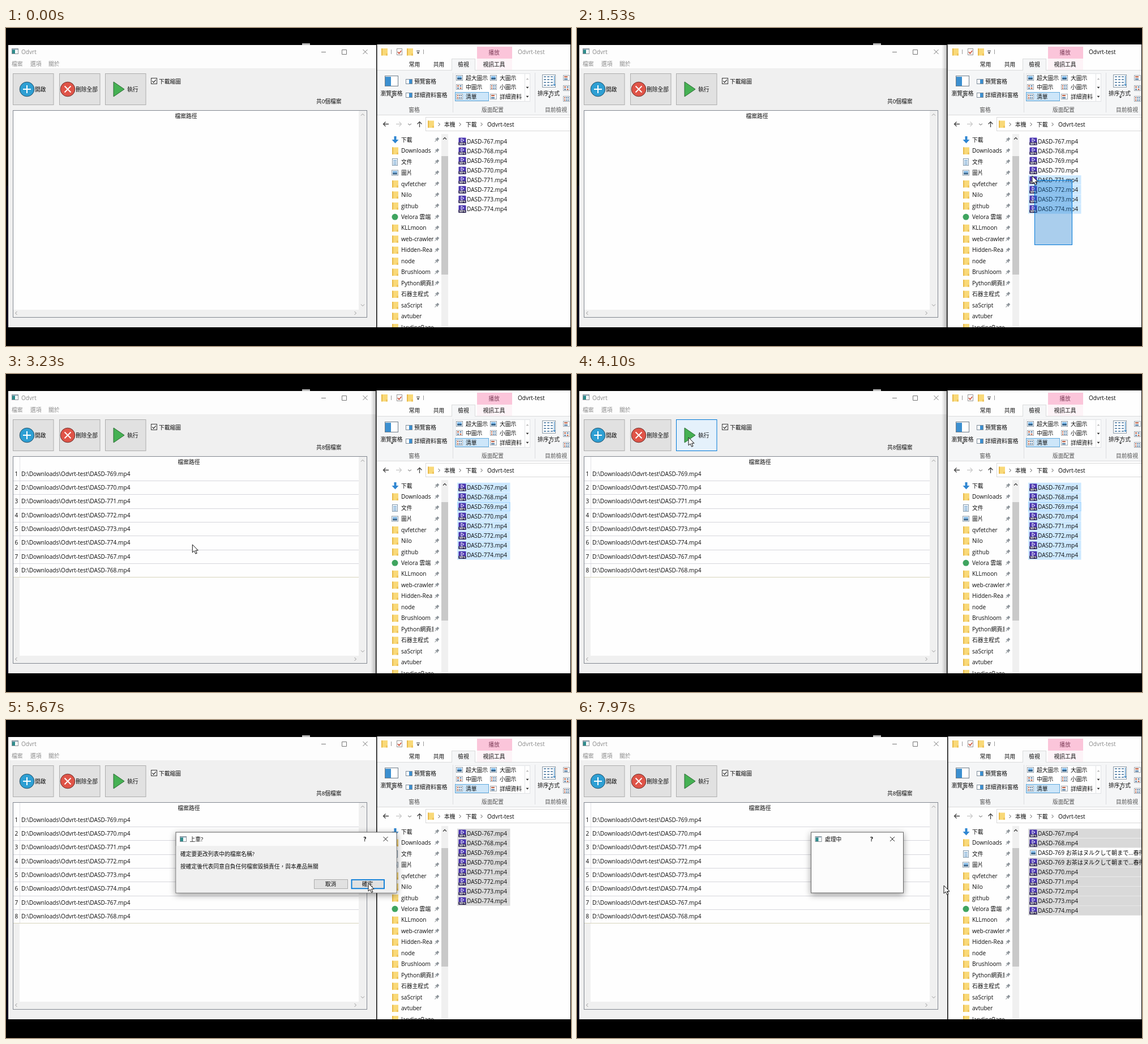
Recreate the animation shown at these times as an HTML page. Size 998 by 561 pixels, loop 8 s.

```html
<!DOCTYPE html>
<html lang="zh-Hant">
<head>
<meta charset="utf-8">
<title>Odvrt</title>
<style>
html, body { margin: 0; width: 100%; height: 100%; overflow: hidden; background: #000; }
svg { display: block; width: 100%; height: 100%; }
text { font-family: 'Open Sans', 'Noto Sans CJK TC', 'Noto Sans CJK JP', sans-serif; white-space: pre; }
.shadow { filter: drop-shadow(0 3px 6px rgba(0, 0, 0, .4)); }
</style>
</head>
<body>
<svg id="stage" viewBox="0 0 998 561" xmlns="http://www.w3.org/2000/svg"></svg>
<script>
const LOOP = 8000;
const INK = '#0c0c0c', GREY = '#8a8a8a', BLUE = '#0078d7';

// Drawing helpers: each returns SVG markup
const rect = (x, y, w, h, fill, stroke, more = '') =>
  `<rect x="${x}" y="${y}" width="${w}" height="${h}" fill="${fill}"${stroke ? ` stroke="${stroke}"` : ''} ${more}/>`;
const box = (x, y, w, h, fill, stroke) => rect(x + .5, y + .5, w - 1, h - 1, fill, stroke);
const path = (d, stroke, fill = 'none', w = 1) =>
  `<path d="${d}" stroke="${stroke}" fill="${fill}" stroke-width="${w}"/>`;
const fontSize = s => /[\u3000-\u9fff]/.test(s) && !/[A-Za-z]/.test(s) ? 9.75 : 10.1;
const text = (x, y, s, color = INK, anchor = 'start', weight = 400) =>
  `<text x="${x}" y="${y + 3.7}" fill="${color}" text-anchor="${anchor}" font-weight="${weight}" font-size="${fontSize(s)}">${s}</text>`;
const mid = (x, y, s, color, weight) => text(x, y, s, color, 'middle', weight);
const group = (id, body, more = '') => `<g id="${id}" ${more}>${body}</g>`;
const times = (n, fn) => Array.from({ length: n }, (_, i) => fn(i)).join('');
const caret = (x, y, color = '#333', s = 1) => path(`M${x - 2.5} ${y - 1.2 * s}h5l-2.5 ${3 * s}z`, 'none', color);
const chevron = (x, y, dx, dy, color) => dx
  ? path(`M${x - dx} ${y - 3}l${2 * dx} 3l${-2 * dx} 3`, color)
  : path(`M${x - 3} ${y - dy}l3 ${2 * dy}l3 ${-2 * dy}`, color);
const cross = (x, y, r, color, w = 1) =>
  path(`M${x - r} ${y - r}l${2 * r} ${2 * r}M${x + r} ${y - r}l${-2 * r} ${2 * r}`, color, 'none', w);

// Icons
const folder = (x, y) => rect(x, y - 6, 11, 12.5, '#f9d978') + rect(x, y - 6, 2, 12.5, '#e8b94a') + rect(x + 8, y + 3, 3, 3.5, '#eec35c');
const picture = (x, y) => box(x, y - 5, 12, 10, '#fff', '#8a98a5') + rect(x + 2, y - 3, 8, 3, '#7db8e8') + rect(x + 2, y, 8, 3, '#38658c');
const paper = (x, y) => box(x + 1, y - 6, 10, 13, '#fff', '#7f95a8') + times(4, i => rect(x + 3, y - 3 + i * 2.4, 6, 1, '#4c8dc4'));
const winIcon = (x, y) => box(x, y - 5, 12, 10, '#fff', '#8a9298') + rect(x + 1, y - 3, 5, 7, '#2f8c8c') + rect(x + 1, y - 4, 10, 1.5, '#9cb3c4');
const video = (x, y) => rect(x, y - 6.5, 13, 13, '#4b35b0', '', 'rx="1"')
  + path(`M${x + 4.5} ${y - 5}l5 3l-5 3z`, '#fff') + rect(x, y + 1.5, 13, 5, '#191238')
  + `<text x="${x + 6.5}" y="${y + 6}" fill="#fff" font-size="5" font-weight="700" text-anchor="middle">MP4</text>`;
const pane = (x, y, side) => box(x, y - 4, 12, 9, '#fff', '#7b8a98') + rect(x + side, y - 3, 5, 7, '#3b8fd0');
const tiles = (x, y, n) => box(x, y - 5, 12, 10, '#fff', '#a0a8b0')
  + times(n * 2, i => rect(x + 2 + (i % n) * (9 / n), y - 3 + Math.floor(i / n) * 4, 6 / n, 2.4, i % 3 ? '#5b83a8' : '#c06a50'));
const pin = (x, y) => `<g transform="translate(${x} ${y}) rotate(45)">${rect(-2, -4, 4, 4, '#8d949a')}${rect(-3, 0, 6, 1.2, '#8d949a')}${rect(-.5, 1, 1, 4, '#8d949a')}</g>`;

function appWindow() {
  const button = (id, x, icon, tx, label) =>
    box(x, 80, 72.5, 56, '#e1e1e1', '#adadad').replace('<rect', `<rect id="${id}"`) + icon + text(tx, 108, label, INK, 'start', 500);
  const disc = (x, fill, edge) => `<circle cx="${x}" cy="108" r="12.8" fill="${fill}" stroke="${edge}"/>`;
  return rect(4, 30, 650, 498, '#f0f0f0') + rect(4, 30, 650, 41, '#fdfdfd')
    + winIcon(10, 41) + text(27, 42, 'Odvrt', GREY)
    + path('M557 42.5h8M593.5 38.5h8v8h-8z', '#777') + cross(634.5, 42, 4, '#777')
    + text(10, 63, '檔案', GREY) + text(43, 63, '選項', GREY) + text(75, 63, '關於', GREY)
    + button('open', 12, disc(37, '#2e9fd3', '#28536b') + path('M30 108h14M37 101v14', '#fff', 'none', 2), 51, '開啟')
    + button('clear', 94, disc(109, '#df5448', '#6e3430') + cross(109, 108, 5.5, '#fff', 1.8), 123, '刪除全部')
    + button('run', 175, path('M190 95L209 108L190 121z', '#2c6b34', '#45b153'), 214, '執行')
    + box(256, 88, 11, 11, '#fff', '#333') + path('M258.5 93.5l2.3 2.6l4-5', '#222', 'none', 1.2)
    + text(270, 94, '下載縮圖', INK, 'start', 500)
    + group('count', '')
    + box(12, 145, 626, 366, '#fefefe', '#828790')
    + rect(623, 146, 14, 364, '#f0f0f0') + rect(13, 497, 624, 13, '#f0f0f0')
    + chevron(630, 153, 0, -1.5, '#999') + chevron(630, 489, 0, 1.5, '#999')
    + chevron(18, 503, -1.5, 0, '#999') + chevron(617, 503, 1.5, 0, '#999')
    + group('table', '');
}

function tableRows(filled) {
  if (!filled) return mid(318, 155, '檔案路徑');
  return mid(323, 155, '檔案路徑') + rect(13, 359, 11, 138, '#f0f0f0') + rect(24, 146, 1, 213, '#e2e2e6')
    + times(8, i => {
      const y = 176 + i * 24.33;
      return mid(18.5, y, String(i + 1)) + text(27, y, `D:\\Downloads\\Odvrt-test\\DASD-${767 + (i + 2) % 8}.mp4`)
        + rect(13, Math.round(y + 12), 610, 1, i < 7 ? '#d6d6dc' : '#d8d4bc');
    });
}

const places = ['下載', 'Downloads', '文件', '圖片', 'qvfetcher', 'Nilo', 'github', 'Velora 雲端', 'KLLmoon', 'web-crawler',
  'Hidden-Rea', 'node', 'Brushloom', 'Python網頁爬', '石器主程式', 'saScript', 'avtuber', 'landingPage'];
const placeY = i => 197 + i * 19.47;

function placeIcon(i) {
  const y = placeY(i);
  if (i === 0) return path(`M685.5 ${y - 6}h4v6h4l-6 6.5l-6-6.5h4z`, 'none', '#2f86d1');
  if (i === 2) return paper(681, y);
  if (i === 3) return picture(681, y);
  if (i === 7) return `<circle cx="687" cy="${y}" r="5.5" fill="#3fa45f"/>`;
  return folder(682, y);
}

function ribbon() {
  const line = x => rect(x, 79, 1, 70, '#dcdde0');
  return rect(655, 74, 342, 79, '#f5f6f7') + rect(655, 74, 342, 1, '#dadbdc') + rect(655, 153, 342, 1, '#dadbdc')
    + rect(832, 33, 62, 21, '#fbc5da') + rect(832, 54, 62, 20, '#fdf3f7') + box(787, 54, 42, 21, '#f5f6f7', '#dadbdc') + rect(788, 73, 40, 2, '#f5f6f7')
    + mid(862, 43, '播放', '#7d3c58') + mid(721.5, 64, '常用') + mid(764.5, 64, '共用') + mid(808, 64, '檢視') + mid(862, 64, '視訊工具')
    + folder(663, 42) + rect(680, 38, 1, 8, '#999') + box(690, 36, 10, 12, '#fff', '#999') + path('M692 42l2.2 3l4-5', '#c9462f', 'none', 1.4)
    + folder(708, 42) + rect(725, 40, 6, 1, '#333') + caret(728, 44) + rect(737, 38, 1, 8, '#999')
    + box(669, 84, 24, 19, '#fff', '#6f7d8a') + rect(670, 86, 10, 16, '#3b8fd0') + mid(681, 115, '瀏覽窗格') + caret(682, 122)
    + pane(706, 94, 6) + text(721, 94, '預覽窗格') + pane(706, 118, 6) + text(721, 118, '詳細資料窗格') + mid(721, 144, '窗格', '#555')
    + line(789) + box(793, 80, 133, 50, '#fff', '#e0e2e5') + rect(916, 81, 1, 48, '#e0e2e5')
    + box(793, 113, 60, 16, '#cde6f9', '#5fa8dc')
    + picture(795, 88) + text(812, 88, '超大圖示') + picture(855, 88) + text(872, 88, '大圖示')
    + tiles(795, 104, 2) + text(812, 104, '中圖示') + tiles(855, 104, 3) + text(872, 104, '小圖示')
    + tiles(795, 121, 3) + text(812, 121, '清單') + tiles(855, 121, 1) + text(872, 121, '詳細資料')
    + caret(921, 90, '#bbb', -1) + caret(921, 105) + caret(921, 121) + mid(859.5, 144, '版面配置', '#555')
    + line(934) + box(947, 82, 24, 23, '#fff', '#8b99a5') + times(12, i => rect(950 + (i % 3) * 6, 85 + Math.floor(i / 3) * 5, 4, 2, '#6f93b3'))
    + path('M968.5 84v18m-2-3l2 3l2-3', '#2f7fc0') + mid(958.5, 115, '排序方式') + caret(960, 122)
    + [88, 106, 125].map((y, i) => tiles(984, y, i + 1)).join('') + mid(971.5, 144, '目前檢視', '#555');
}

function explorer() {
  const crumb = x => chevron(x, 170, 1.4, 0, '#555');
  return rect(644, 30, 10, 498, 'url(#dim)', '', 'id="dimmed"') + rect(654, 29, 343, 499, '#fefefe') + ribbon() + group('title', '')
    + path('M676 169.5h-9.5m4-4l-4 4l4 4', '#444', 'none', 1.3) + path('M689 169.5h9.5m-4-4l4 4l-4 4', '#ccc', 'none', 1.3)
    + chevron(713, 170, 0, 1.2, '#666') + path('M730.5 175v-9.5m-4 4l4-4l4 4', '#444', 'none', 1.3)
    + box(741, 157, 270, 25, '#fff', '#d9d9d9') + folder(745, 169.5)
    + crumb(765) + text(774, 170, '本機') + crumb(802) + text(812, 170, '下載') + crumb(840) + text(850, 170, 'Odvrt-test')
    + group('target', '')
    + `<g clip-path="url(#names)">${places.map((s, i) => text(698, placeY(i), s)).join('')}</g>`
    + `<g clip-path="url(#list)">${places.map((_, i) => placeIcon(i) + (i < 16 ? pin(761, placeY(i)) : '')).join('')}</g>`
    + rect(769, 187, 12, 341, '#f0f0f0') + rect(769, 226, 12, 209, '#c9c9c9') + path('M772 196.5l3-3l3 3', '#444', 'none', 1.3)
    + group('files', '') + rect(654, 29, 1.6, 499, '#111', '', 'id="edge"') + rect(997, 0, 1, 561, '#000');
}

function fileRows(names, picked, active, focus) {
  const wide = names.length > 8;
  return names.map((name, i) => {
    const y = 200 + i * 17.05, top = y - 8.3;
    const back = picked(i) ? rect(797, top, wide ? 201 : 93.5, 16.6, active ? '#cce8ff' : '#d9d9d9') : '';
    const ring = focus && i === 2 ? rect(797.5, top + .5, 92.5, 15.6, 'none', '#99d1ff') : '';
    const icon = wide && i === 2 ? picture(800, y) : video(799.5, y);
    return back + ring + icon + text(814, y, name);
  }).join('');
}

function dialog(id, x, w, label, body) {
  return group(id, rect(x, 198, w, 107, '#fcfcfc', '#666', 'class="shadow"') + body
    + winIcon(x + 7, 210) + text(x + 24.5, 210, label)
    + mid(x + w - 56, 210, '?', INK, 700) + cross(x + w - 19.5, 210, 4, '#222'));
}

const confirmBody = rect(300.5, 222, 389, 82.5, '#f0f0f0')
  + text(308, 236, '確定要更改列表中的檔案名稱?') + text(308, 258, '按確定後代表同意自負任何檔案毀損責任，與本產品無關')
  + box(544, 281, 60, 17, '#e1e1e1', '#adadad') + mid(573.5, 289.5, '取消', INK, 500)
  + rect(610.5, 281.8, 57.5, 15.5, '#e1e1e1', BLUE, 'stroke-width="1.8"') + mid(638.5, 289.5, '確定', INK, 500);

const dragImage = rect(-26, -78, 83, 85, 'url(#ghost)') + path('M57 -77V7H-25', 'rgba(60,90,120,.35)', 'none', 1.5)
  + rect(7, -43, 14, 14, BLUE) + mid(14, -36, '8', '#fff', 700)
  + rect(26, 12, 11, 11, '#fff', '', 'opacity=".8"') + path('M27.5 17h8M31.5 13v8', '#1050c0', 'none', 2);

document.getElementById('stage').innerHTML = `<defs>
  <clipPath id="names">${rect(656, 186, 99, 342, '#000')}</clipPath>
  <clipPath id="list">${rect(656, 186, 113, 342, '#000')}</clipPath>
  <linearGradient id="ghost" x1="0" y1="0" x2="1" y2="1"><stop stop-color="#eaf5fb" stop-opacity=".5"/><stop offset="1" stop-color="#b4dcf0" stop-opacity=".4"/></linearGradient>
  <linearGradient id="dim"><stop stop-opacity="0"/><stop offset="1" stop-opacity=".25"/></linearGradient>
  </defs>` + rect(0, 0, 998, 561, '#000') + rect(523, 27, 14, 3, '#bbb') + rect(2, 278, 1, 250, '#1f1745')
  + appWindow() + explorer()
  + dialog('confirm', 300, 390, '上車?', confirmBody) + dialog('working', 413.5, 163, '處理中', '')
  + rect(0, 0, 0, 0, 'rgba(20,120,205,.36)', BLUE, 'id="lasso"')
  + group('drag', dragImage)
  + group('cursor', path('M0 0V14L3.2 11L5.6 16.3L7.9 15.3L5.6 10.2H10Z', '#111', '#fff'));

const el = {};
document.querySelectorAll('[id]').forEach(n => el[n.id] = n);
const cache = {};
function fill(id, html) {
  if (cache[id] !== html) el[id].innerHTML = cache[id] = html;
}
const show = (id, on) => el[id].setAttribute('visibility', on ? 'visible' : 'hidden');
const move = (id, p) => el[id].setAttribute('transform', `translate(${p.x.toFixed(1)} ${p.y.toFixed(1)})`);
const attrs = (id, o) => { for (const k in o) el[id].setAttribute(k, o[k]); };

// Pointer path: time, x, y
const trail = [
  [200, 930, 522], [850, 875, 383], [1000, 875, 383], [1530, 804, 261], [1850, 800, 194], [1920, 800, 194],
  [2070, 835, 236], [2170, 835, 236], [2600, 694, 278], [3050, 330, 302], [3200, 330, 302], [3850, 205, 120],
  [4100, 197, 112], [4550, 197, 112], [4800, 283, 141], [5500, 640, 288], [5950, 640, 288], [6330, 653, 294],
  [6900, 653, 294], [7600, 648, 292], [8000, 648, 292]
];
// Monotone cubic interpolation, so that the pointer never overshoots
function along(t, k) {
  const last = trail.length - 1;
  t = Math.min(Math.max(t, trail[0][0]), trail[last][0]);
  let i = 0;
  while (i < last - 1 && trail[i + 1][0] < t) i++;
  const rise = j => j < 0 || j >= last ? 0 : (trail[j + 1][k] - trail[j][k]) / (trail[j + 1][0] - trail[j][0]);
  const slope = j => {
    const a = rise(j - 1), b = rise(j);
    return a * b > 0 ? 2 * a * b / (a + b) : 0;
  };
  const [a, b] = [trail[i], trail[i + 1]], h = b[0] - a[0], u = (t - a[0]) / h, v = 1 - u;
  return a[k] * v * v * (1 + 2 * u) + b[k] * u * u * (3 - 2 * u) + h * u * v * (slope(i) * v - slope(i + 1) * u);
}
const pointer = t => ({ x: along(t, 1), y: along(t, 2) });

const clips = Array.from({ length: 8 }, (_, i) => `DASD-${767 + i}.mp4`);
const renamed = 'DASD-769 お茶はヌルクして朝まで...春待';
const after = [...clips.slice(0, 2), renamed, renamed, ...clips.slice(3)];

const PRESS = 950, RELEASE = 1900, GRAB = 2150, DROP = 3120, RUN = 4350, ASK = 4480, OK = 5950, WORK = 6000, DONE = 7700;

function draw(t) {
  const p = pointer(t), active = t >= PRESS - 50 && t < RUN;
  show('cursor', t >= 200);
  move('cursor', p);

  // The selection box trails slightly behind the pointer
  const lasso = t >= PRESS && t < RELEASE, q = pointer(t - 32);
  show('lasso', lasso && q.y < 382);
  const left = Math.round(q.x + 3) + .5, top = Math.round(q.y) + .5;
  attrs('lasso', { x: left, y: top, width: Math.max(0, 874.5 - left), height: Math.max(0, 382.5 - top) });

  const dragging = t >= GRAB && t < DROP;
  show('drag', dragging);
  move('drag', p);
  const over = Math.round((p.y - 197) / 19.47);
  fill('target', dragging && p.x > 656 && p.x < 768 ? rect(656, placeY(over) - 9.7, 112, 19.4, '#c5e2f8') : '');

  const picked = i => t >= RELEASE || (lasso && q.y < 208.5 + i * 17.05);
  const done = t >= DONE;
  fill('files', fileRows(done ? after : clips, i => picked(i) && !(done && i === 2), active, active && t >= GRAB));
  fill('title', text(904, 42, 'Odvrt-test', active ? INK : GREY));
  attrs('edge', { x: active ? 653 : 654 });
  show('dimmed', active);

  const loaded = t >= DROP;
  fill('table', tableRows(loaded));
  fill('count', text(548, 129, `共${loaded ? 8 : 0}個檔案`, INK, 'start', 500));
  const hover = t > DROP && t < ASK && p.x > 175 && p.x < 247 && p.y > 80 && p.y < 136;
  attrs('run', { fill: hover ? '#e5f1fb' : '#e1e1e1', stroke: hover ? BLUE : '#adadad' });
  show('confirm', t >= ASK && t < OK);
  show('working', t >= WORK);
}

const start = performance.now();
function tick() {
  draw((performance.now() - start) % LOOP);
  requestAnimationFrame(tick);
}
draw(0);
requestAnimationFrame(tick);
</script>
</body>
</html>
```
